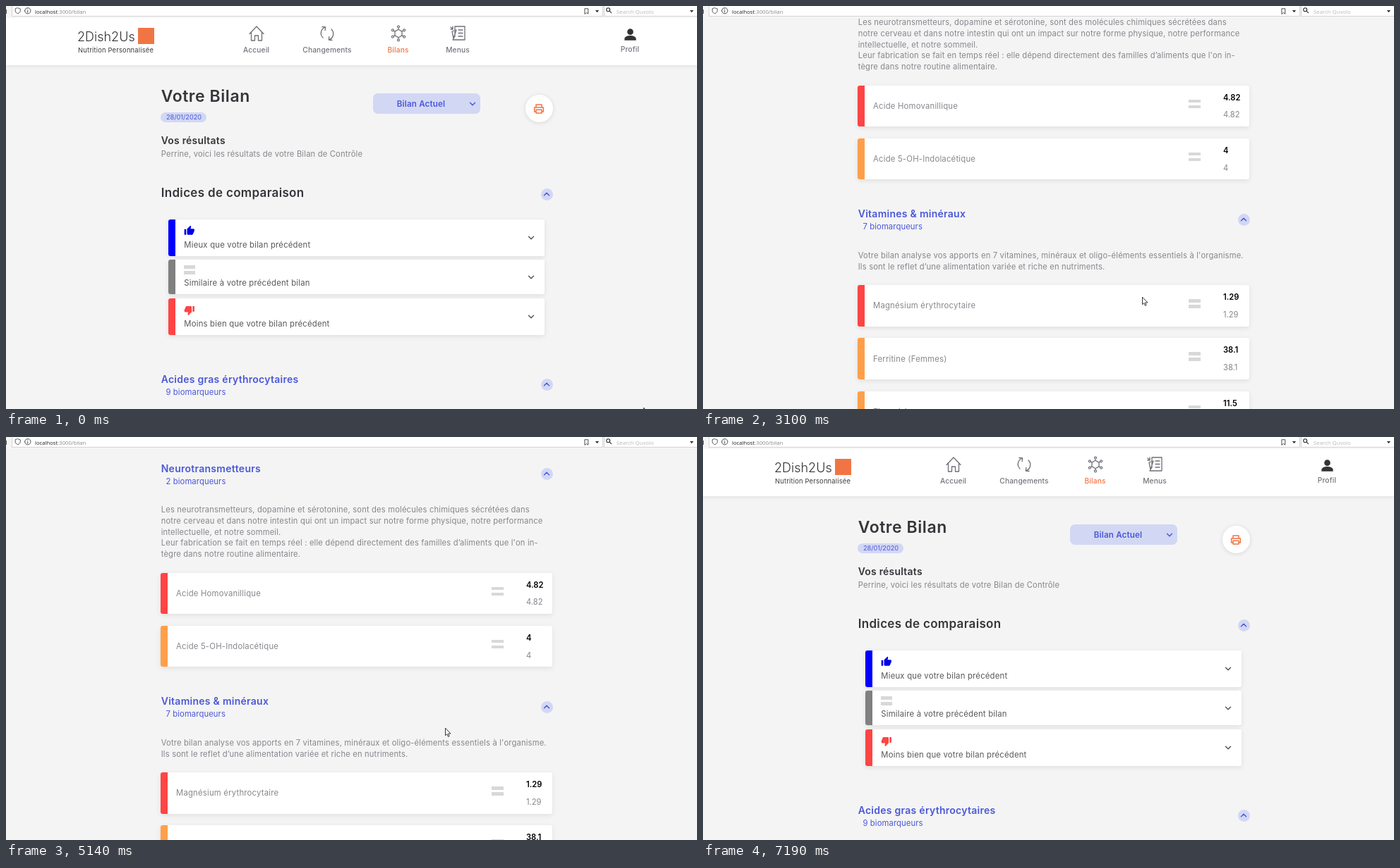
These frames come from a looping animation (979x572 px, 7.5 s). An HTML page:

```html
<!DOCTYPE html>
<html lang="fr">
<head>
<meta charset="utf-8">
<title>Bilan</title>
<style>
  html, body { margin: 0; width: 100%; height: 100%; overflow: hidden; background: #f4f4f4; }
  #stage { position: absolute; left: 0; top: 0; width: 979px; height: 572px; overflow: hidden; font-family: Inter, sans-serif; }
  #stage div, #stage svg { position: absolute; }
  #stage .text { line-height: 20px; white-space: pre; }
  #page { left: 0; top: 0; width: 979px; height: 2860px; will-change: transform; }
  #bar { left: 0; top: 0; width: 979px; height: 17px; background: #f5f5f6; font-family: "Open Sans", sans-serif; }
  .field { top: -1px; height: 14px; background: #fff; border: 1px solid #d4d4d6; }
  .head { left: 0; top: 0; width: 979px; height: 83.5px; background: #fff; box-shadow: 0 1px 6px rgba(0,0,0,.1); }
  .card { background: #fff; border-radius: 3px; box-shadow: 0 2px 7px rgba(0,0,0,.09); }
  .edge { left: 0; top: 0; width: 10px; height: 100%; border-radius: 3px 0 0 3px; }
  .same { height: 4.5px; background: #d8d8d8; }
  svg { overflow: visible; fill: none; stroke-linecap: round; stroke-linejoin: round; }
</style>
</head>
<body>
<div id="stage">
  <div id="page"></div>
  <div id="bar"></div>
  <svg id="cursor" width="10" height="14" viewBox="0 0 10 14">
    <path d="M.5.5v10.2l2.3-2.1 1.7 3.7 1.6-.7-1.6-3.6h3.1z" fill="#fff" stroke="#222" stroke-width=".9"/>
  </svg>
</div>
<script>
const page = document.getElementById('page');
const bar = document.getElementById('bar');
const cursor = document.getElementById('cursor');

const DARK = '#35353a', GREY = '#86878d', BODY = '#58585c', BLUE = '#4a58d8', PALE = '#d2d7f4';
const ORANGE = '#ff9f4a', RED = '#ff4444', GREEN = '#66c656', BRAND = '#f17544';
const LEFT = 219;

function box(parent, x, y, w, h, style = '', cls = '') {
  const el = document.createElement('div');
  el.className = cls;
  el.style.cssText = `left:${x}px;top:${y}px;width:${w}px;height:${h}px;${style}`;
  parent.append(el);
  return el;
}

// y is the middle of the capitals
function text(x, y, str, size, color, weight = 400, opt = {}) {
  const el = document.createElement('div');
  el.className = 'text';
  el.textContent = str;
  el.style.cssText = `left:${x}px;top:${y - 10}px;font-size:${size}px;color:${color};` +
    `font-weight:${weight};letter-spacing:${opt.space ?? 0.019 * size}px;` +
    (opt.center ? 'transform:translateX(-50%)' : '');
  (opt.parent || page).append(el);
  return el;
}

function icon(x, y, size, d, color, width = 0, opt = {}) {
  const paint = width ? `stroke="${color}" stroke-width="${width}"` : `fill="${color}"`;
  (opt.parent || page).insertAdjacentHTML('beforeend',
    `<svg width="${size}" height="${size}" viewBox="0 0 24 24" style="left:${x - size / 2}px;top:${y - size / 2}px;` +
    `transform:rotate(${opt.turn || 0}deg)"><path d="${d}" ${paint}/></svg>`);
}

const chevron = (x, y, color, turn = 0) => icon(x, y, 14, 'M6 9l6 6 6-6', color, 2.5, { turn });
const heading = (y, str, size, opt) => text(LEFT + 0.7, y, str, size, DARK, 600, opt);

function lines(y, rows) {
  rows.forEach((row, i) => text(LEFT + 0.7, y + i * 15.7, row, 11.2, GREY, 400, { space: 0.17 }));
}

function toggle(y) {
  box(page, 757.5, y - 8.5, 17, 17, `border-radius:50%;background:${PALE}`);
  chevron(766, y - 0.5, BLUE, 180);
}

function section(y, title, count) {
  text(LEFT + 0.7, y, title, 14, BLUE, 600);
  text(226.5, y + 18, `${count} biomarqueurs`, 11.3, BLUE, 400, { space: 0.08 });
  toggle(y + 8);
}

function card(x, y, w, h, color) {
  const el = box(page, x, y, w, h, '', 'card');
  el.innerHTML = `<div class="edge" style="background:${color}"></div>`;
}

function equal(x, y, w) {
  box(page, x, y, w, 4.5, '', 'same');
  box(page, x, y + 8, w, 4.5, '', 'same');
}

function markers(y, rows) {
  rows.forEach(([name, value, color], i) => {
    const top = y + i * 75.2;
    card(LEFT, top, 555, 58.5, color);
    text(241, top + 29.2, name, 11.3, GREY);
    equal(688, top + 20, 17);
    text(737, top + 17, value, 11.2, '#000', 600, { space: 0 });
    text(737, top + 41.7, value, 11.2, GREY, 400, { space: 0 });
  });
}

function browserBar() {
  const parent = bar;
  box(bar, 8, -1, 836, 14, '', 'field');
  box(bar, 847, -1, 140, 14, '', 'field');
  box(bar, 0, 5, 1, 6, 'background:#555');
  icon(17, 7, 9.5, 'M12 2l9 3v7c0 5-4 8-9 10-5-2-9-5-9-10V5z', '#555', 2.4, { parent });
  icon(31, 7, 9.5, 'M1.5 12a10.5 10.5 0 1 0 21 0a10.5 10.5 0 1 0-21 0M12 11v7M12 6v.5', '#444', 2.4, { parent });
  text(41, 7.5, 'localhost', 7.7, '#222', 400, { parent, space: 0 })
    .insertAdjacentHTML('beforeend', '<span style="color:#888">:3000/bilan</span>');
  icon(822.5, 7, 9, 'M6 2h12v20l-6-5-6 5z', '#444', 2.5, { parent });
  for (const x of [837, 971]) icon(x, 7, 7, 'M3 7h18l-9 11z', '#333', 0, { parent });
  icon(854.5, 6.5, 8.5, 'M2 9a7 7 0 1 0 14 0a7 7 0 1 0-14 0M14.5 14.5l7 7', '#222', 3, { parent });
  text(865, 7.5, 'Search Quvolo', 7.8, '#b8b8bc', 400, { parent, space: 0 });
}

// Hexagon ring with a small node on a stem at each corner
function moleculePath() {
  let ring = '', nodes = '';
  for (let i = 0; i < 6; i++) {
    const a = (i * 60 + 30) * Math.PI / 180, c = Math.cos(a), s = Math.sin(a);
    ring += `${i ? 'L' : 'M'}${12 + 5.8 * c} ${12 + 5.8 * s}`;
    nodes += `M${12 + 5.8 * c} ${12 + 5.8 * s}L${12 + 7.9 * c} ${12 + 7.9 * s}` +
      `M${12 + 9.4 * c - 1.5} ${12 + 9.4 * s}a1.5 1.5 0 1 0 3 0a1.5 1.5 0 1 0-3 0`;
  }
  return `${ring}z${nodes}`;
}

function header() {
  box(page, 0, 0, 979, 83.5, '', 'head');
  text(101, 43.5, '2Dish2Us', 18, '#333', 300, { space: 0 });
  box(page, 187, 31, 23, 23, `background:${BRAND}`);
  text(102, 63, 'Nutrition Personnalisée', 9.4, '#3d3d40');

  const nav = [
    [354.5, 'Accueil', 'M2 12.5 12 2l10 10.5M4.5 10.5V22h5v-7h5v7h5V10.5'],
    [455, 'Changements', 'M6 18A9 9 0 0 1 9.5 3M5 2.5l4.7.4-.6 4.6M18 6a9 9 0 0 1-3.5 15M19 21.5l-4.7-.4.6-4.6'],
    [555.5, 'Bilans', moleculePath()],
    [640, 'Menus', 'M8 2h14v19H5l3-5zM13 7h6M13 11.5h6M13 16h6M2 3l3 3M5 2v4H2M4 9l6-2-4 12z']
  ];
  nav.forEach(([x, label, d]) => {
    icon(x, 38.5, 24, d, '#6d7077', 1.3);
    text(x, 61.7, label, 10.2, label === 'Bilans' ? BRAND : '#72747b', 500, { center: true, space: 0.14 });
  });
  icon(884, 40, 23, 'M7.5 8a4.5 4.5 0 1 0 9 0a4.5 4.5 0 1 0-9 0M3.5 20.5V18c0-3 5-4.5 8.5-4.5s8.5 1.5 8.5 4.5v2.5z', '#333');
  text(884, 61, 'Profil', 10.2, '#72747b', 500, { center: true });
}

function intro() {
  heading(128, 'Votre Bilan', 23, { space: 0.55 });
  box(page, LEFT, 151, 65, 13.5, `border-radius:7px;background:${PALE}`);
  text(252, 157.7, '28/01/2020', 9.2, BLUE, 400, { center: true, space: 0 });
  box(page, 520, 124, 152, 29, `border-radius:7px;background:${PALE}`);
  text(588, 138.5, 'Bilan Actuel', 11.6, BLUE, 600, { center: true, space: 0.16 });
  chevron(660.5, 139, BLUE);
  box(page, 735.5, 126, 39, 39, 'border-radius:50%;background:#fff;box-shadow:0 1px 6px rgba(0,0,0,.12)');
  icon(755, 145.5, 16, 'M6 9V3h12v6M6 18H2.5V9h19v9H18M6 14h12v7H6z', BRAND, 2.3);
  heading(191, 'Vos résultats', 13.9);
  lines(209.5, ['Perrine, voici les résultats de votre Bilan de Contrôle']);

  heading(265, 'Indices de comparaison', 17);
  toggle(267.5);
  const thumb = 'M1 21h4V9H1zM23 10c0-1.1-.9-2-2-2h-6.3l1-4.6c.1-.6-.1-1-.4-1.4L14.2 1 7.6 7.6C7.2 8 7 8.5 7 9v10' +
    'c0 1.1.9 2 2 2h9c.8 0 1.5-.5 1.8-1.2l3-7c.1-.3.2-.5.2-.8z';
  const rows = [
    [302.5, 52, '#0000ff', 339, 328.5, 'Mieux que votre bilan précédent'],
    [360, 49, '#808080', 393, 385, 'Similaire à votre précédent bilan'],
    [414.5, 52.5, RED, 451.3, 440.5, 'Moins bien que votre bilan précédent']
  ];
  for (const [y, h, color, ty, cy, label] of rows) {
    card(230, y, 533, h, color);
    text(252.3, ty, label, 11.3, BODY);
    chevron(743.5, cy, '#555');
  }
  icon(260, 318.5, 15.6, thumb, '#0000e6');
  equal(252, 368.2, 16);
  icon(260, 431.5, 15.6, thumb, RED, 0, { turn: 180 });
}

function fats() {
  section(529.5, 'Acides gras érythrocytaires', 9);
  lines(588, [
    'L\'analyse des acides gras érythrocytaires évalue les déficits d’apports en bons gras essentiels, et les',
    'excès d’apport en acides gras facteur de risques que l\'on surnomme ici \'gras à risque\'.',
    'Attention certains de ces \'gras à risque\' sont des apports bénéfiques s\'ils sont consommés en mo-',
    'dération : c\'est lorsqu\'ils sont consommés en excès qu\'ils deviennent délétères pour la santé.',
    '2Dish2Us reprend ici les résultats de 9 acides gras de votre statut en acides gras érythocytaires. Il',
    's\'agit de 9 acides gras représentatifs de vos apports oméga 3, oméga 6, oméga 9 et de vos acides',
    'gras saturés, et des plus étudiés par les sciences de la nutrition.'
  ]);
  text(230.3, 731.5, 'Gras à risque', 12.5, BLUE, 600);
  markers(753.7, [
    ['Acide Myristique', '0.29', ORANGE],
    ['Acide Palmitique', '14.20', GREEN],
    ['Acide Arachidonique', '11.40', GREEN],
    ['Rapport AA / EPA', '9.91', ORANGE]
  ]);
  text(230.3, 1088.3, 'Bons gras', 12.5, BLUE, 600);
  markers(1109.8, [
    ['Acide Oléique', '10.00', ORANGE],
    ['Acide Alpha Linolénique', '0.17', GREEN],
    ['Acide Eicosapentaénoïque', '1.15', GREEN],
    ['Acide Docosahexaénoïque', '6.95', ORANGE],
    ['Oméga-3 Totaux', '10.98', GREEN]
  ]);
}

function brain() {
  section(1546.5, 'Neurotransmetteurs', 2);
  lines(1605.3, [
    'Les neurotransmetteurs, dopamine et sérotonine, sont des molécules chimiques sécrétées dans',
    'notre cerveau et dans notre intestin qui ont un impact sur notre forme physique, notre performance',
    'intellectuelle, et notre sommeil.',
    'Leur fabrication se fait en temps réel : elle dépend directement des familles d’aliments que l\'on in-',
    'tègre dans notre routine alimentaire.'
  ]);
  markers(1694.7, [
    ['Acide Homovanillique', '4.82', RED],
    ['Acide 5-OH-Indolacétique', '4', ORANGE]
  ]);
}

function vitamins() {
  section(1877, 'Vitamines & minéraux', 7);
  lines(1936, [
    'Votre bilan analyse vos apports en 7 vitamines, minéraux et oligo-éléments essentiels à l\'organisme.',
    'Ils sont le reflet d’une alimentation variée et riche en nutriments.'
  ]);
  markers(1978.2, [
    ['Magnésium érythrocytaire', '1.29', RED],
    ['Ferritine (Femmes)', '38.1', ORANGE],
    ['Zinc sérique', '11.5', ORANGE],
    ['Vitamine B9', '8.2', GREEN],
    ['Vitamine B12', '329', GREEN],
    ['Sélénium sérique', '1.04', ORANGE],
    ['Vitamine D', '24.8', ORANGE]
  ]);
}

function legend() {
  heading(2540.5, 'Informations code couleurs', 17);
  const rows = [
    ['Orange', 'Dans les valeurs basses ou hautes des seuils', ORANGE],
    ['Rouge', 'En dehors des seuils', '#ff5540', RED],
    ['Vert', 'Compris dans les seuils', GREEN]
  ];
  rows.forEach(([name, note, color, edge = color], i) => {
    const y = 2563 + i * 53.5;
    card(LEFT, y, 555, 48, edge);
    text(241, y + 16.5, name, 11.3, color);
    text(241, y + 32, note, 11.3, BODY);
    chevron(755, y + 24.5, '#555');
  });
  text(497, 2754.5, 'Découvrez vos changements de la semaine !', 11.2, GREY, 400, { center: true });
  box(page, 437.5, 2782.5, 119, 24.5, 'border-radius:13px;background:#3b3a36;box-shadow:0 2px 5px rgba(0,0,0,.15)');
  text(497, 2794.7, 'PAGE D\'ACCUEIL', 9.2, '#fff', 700, { center: true });
}

[browserBar, header, intro, fats, brain, vitamins, legend].forEach(draw => draw());

// Each run: first step, last step (ms), number of steps, end value
const scrollRuns = [
  [620, 780, 3, 110], [850, 850, 1, 180], [1010, 1160, 3, 340],
  [1300, 1300, 1, 381], [1390, 1860, 7, 740], [2020, 2170, 3, 890],
  [2310, 2310, 1, 946], [2400, 2790, 6, 1380], [3010, 3010, 1, 1490],
  [3100, 3100, 1, 1582], [3170, 3260, 2, 1720], [3420, 3980, 7, 2274],
  [4210, 4360, 3, 2281], [4600, 5230, 9, 1280], [5310, 5620, 5, 800],
  [5770, 5770, 1, 735], [5860, 5860, 1, 651], [5930, 6240, 5, 330],
  [6380, 6780, 6, 0]
];
const cursorRuns = [[70, 540, 7, 1], [6860, 7090, 4, 2]];

function valueAt(runs, t) {
  let value = 0;
  for (const [start, end, steps, to] of runs) {
    if (t < start) break;
    const gap = (end - start) / (steps - 1) || 1;
    const done = Math.min(steps, Math.floor((t - start) / gap + 0.001) + 1);
    value += (to - value) * done / steps;
  }
  return value;
}

const LOOP = 7500;
const began = performance.now();
const mix = (a, b, k) => a + (b - a) * k;

function frame() {
  const t = Math.max(0, performance.now() - began) % LOOP;
  page.style.transform = `translateY(${-Math.round(valueAt(scrollRuns, t))}px)`;
  const c = valueAt(cursorRuns, t);
  const x = c < 1 ? mix(903, 622, c) : mix(622, 939, c - 1);
  const y = c < 1 ? mix(570, 413, c) : mix(413, 566, c - 1);
  cursor.style.transform = `translate(${x}px, ${y}px)`;
  cursor.style.visibility = t < 7190 ? 'visible' : 'hidden';
  requestAnimationFrame(frame);
}
frame();
</script>
</body>
</html>
```
